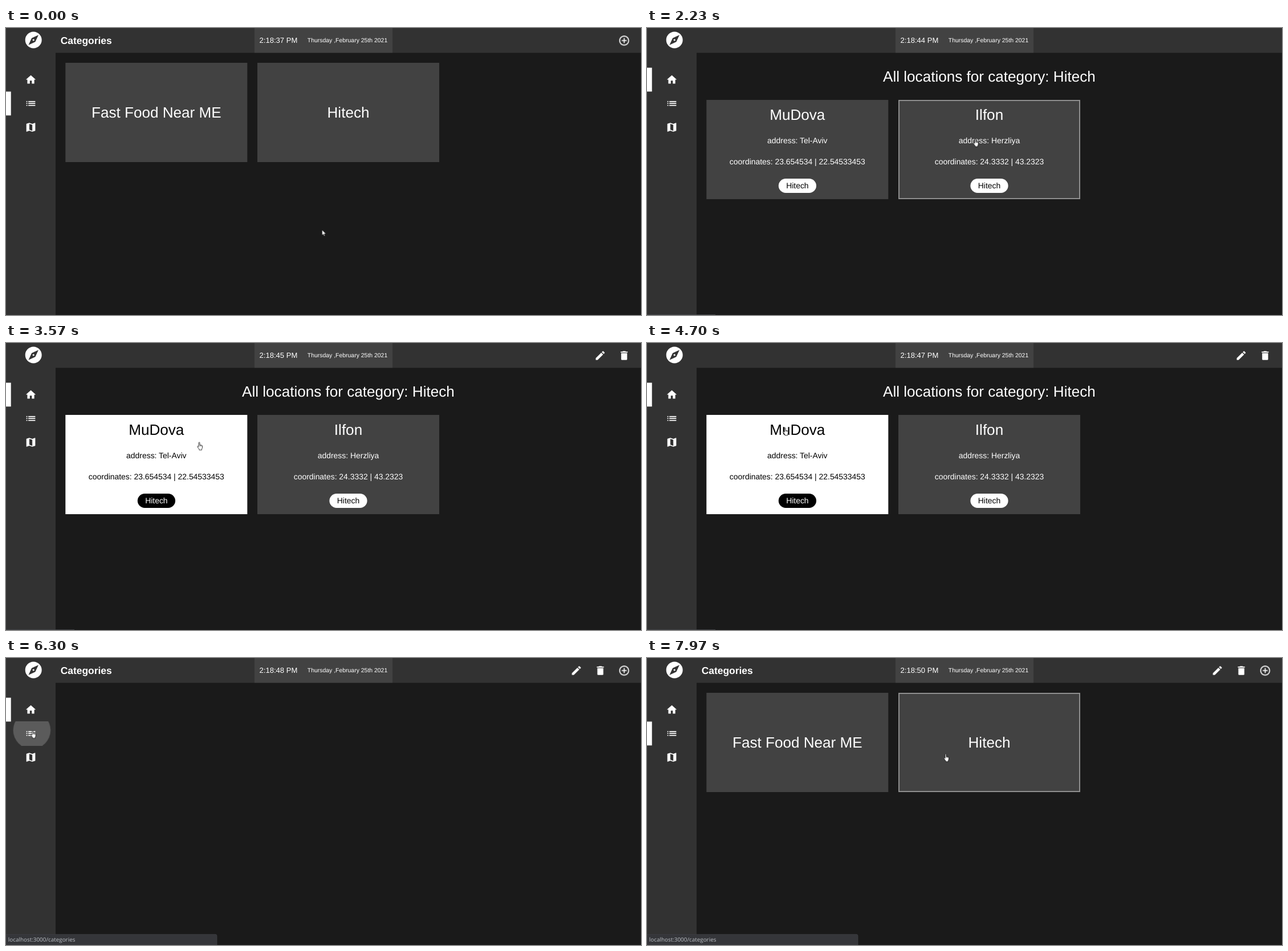
Animation, 1114 px wide and 503 px high, one loop 8000 ms. Source, as an HTML page:

```html
<!DOCTYPE html>
<html lang="en">
<head>
<meta charset="utf-8">
<title>Categories</title>
<style>
html, body { margin: 0; width: 100%; height: 100%; overflow: hidden; background: #1a1a1a; }
svg { position: absolute; left: 0; top: 0; }
svg, .clock { font-family: "Liberation Sans", Arial, sans-serif; text-rendering: geometricPrecision; }
text { fill: #fff; }
.big { font-size: 26.1px; text-anchor: middle; }
.mid { font-size: 13.92px; text-anchor: middle; }
.icon { fill: #fff; }
.edge { fill: none; stroke: #8e8e8e; stroke-width: 2; }

/* cards */
.card { --bg: #424242; --ink: #fff; --tag: #000; }
.card .bg { fill: var(--bg); }
.card text, .card .chip { fill: var(--ink); }
.card .tag { fill: var(--tag); }

/* one 8 s loop, hard changes */
.t { animation: 8s step-end infinite; }
.locations { animation-name: locations; }
.heading { animation-name: heading; }
.categories { animation-name: categories; }
.bar { animation-name: bar; }
.tools { animation-name: tools; }
.marked { animation-name: marked; }
.popup { animation-name: popup; }
.litA { animation-name: litA; }
.litB { animation-name: litB; }
.edgeA { animation-name: edgeA; }
.edgeB { animation-name: edgeB; }
.edgeC { animation-name: edgeC; }
.edgeD { animation-name: edgeD; }
.sliver { animation-name: sliver; }
.status { animation-name: status; }
.wide { animation-name: wide; }
.arrow { animation-name: arrow; }
.hand { animation-name: hand; }

@keyframes locations { 0% { opacity: 0 } 6.25% { opacity: 1 } 77.125%, 100% { opacity: 0 } }
@keyframes heading { 0% { opacity: 1 } 6.25% { opacity: 0 } 77.125%, 100% { opacity: 1 } }
@keyframes categories { 0% { opacity: 1 } 6.25% { opacity: 0 } 80.4%, 100% { opacity: 1 } }
@keyframes bar {
  0% { transform: translateY(41.8px) }
  6.25% { transform: none }
  80.4%, 100% { transform: translateY(41.8px) }
}
@keyframes tools {
  0% { opacity: 0; transform: none }
  30.4% { opacity: 1; transform: none }
  77.125%, 100% { opacity: 1; transform: translateX(-41.8px) }
}
@keyframes marked { 0% { opacity: 0 } 11.25% { opacity: 1 } 22.1%, 100% { opacity: 0 } }
@keyframes popup { 0% { opacity: 0 } 17.125% { opacity: 1 } 22.1%, 100% { opacity: 0 } }
@keyframes litA {
  0% { --bg: #424242; --ink: #fff; --tag: #000 }
  44.625%, 100% { --bg: #fff; --ink: #000; --tag: #fff }
}
@keyframes litB {
  0% { --bg: #424242; --ink: #fff; --tag: #000 }
  30.4% { --bg: #fff; --ink: #000; --tag: #fff }
  44.625%, 100% { --bg: #424242; --ink: #fff; --tag: #000 }
}
@keyframes edgeA { 0% { opacity: 0 } 37.25% { opacity: 1 } 44.625%, 100% { opacity: 0 } }
@keyframes edgeB { 0% { opacity: 0 } 22.4% { opacity: 1 } 30.4%, 100% { opacity: 0 } }
@keyframes edgeC { 0% { opacity: 0 } 89.6% { opacity: 1 } 98.75%, 100% { opacity: 0 } }
@keyframes edgeD { 0% { opacity: 0 } 98.75%, 100% { opacity: 1 } }
@keyframes sliver { 0% { opacity: 0 } 6.25% { opacity: 1 } 67%, 100% { opacity: 0 } }
@keyframes status { 0% { opacity: 0 } 67%, 100% { opacity: 1 } }
@keyframes wide { 0% { width: 131px } 77.125%, 100% { width: 373px } }
@keyframes arrow {
  0% { opacity: 1 } 22.4% { opacity: 0 } 61.7% { opacity: 1 } 64.2%, 100% { opacity: 0 }
}
@keyframes hand {
  0% { opacity: 0 } 22.4% { opacity: 1 } 61.7% { opacity: 0 } 64.2%, 100% { opacity: 1 }
}

.clock {
  position: absolute; left: 444.6px; top: 14px;
  font-size: 13.05px; line-height: 15px; color: #fff; white-space: pre;
}
.clock::after { content: "2:18:37 PM"; animation: clock 8s step-end infinite; }
@keyframes clock {
  0% { content: "2:18:37 PM" }
  6.25% { content: "2:18:43 PM" }
  20.375% { content: "2:18:44 PM" }
  32.875% { content: "2:18:45 PM" }
  45.375% { content: "2:18:46 PM" }
  57.875% { content: "2:18:47 PM" }
  69.5% { content: "2:18:48 PM" }
  82.5% { content: "2:18:49 PM" }
  95%, 100% { content: "2:18:50 PM" }
}

.spin { transform-origin: 915.5px 118.3px; animation: spin 1s steps(8) .37s infinite; }
@keyframes spin { to { transform: rotate(360deg) } }

.ripple { fill: #fff; transform-origin: 45.3px 126.5px; animation: ripple 8s linear infinite; }
@keyframes ripple {
  0%, 77.1% { opacity: 0; transform: scale(.2) }
  77.125% { opacity: .2; transform: scale(.35) }
  78.7% { opacity: .2; transform: scale(1) }
  80.4% { opacity: .2; transform: scale(1.25) }
  85%, 100% { opacity: 0; transform: scale(1.25) }
}

.pointer { animation: move 8s linear infinite; }
@keyframes move {
  0%, 6.24% { transform: translate(554.5px, 353.8px) }
  6.25%, 11.24% { transform: translate(798px, 85px) }
  11.25%, 20% { transform: translate(787.7px, 89.3px) }
  27.1% { transform: translate(575px, 196px) }
  30%, 34.7% { transform: translate(563px, 188px) }
  37.875% { transform: translate(388px, 177px) }
  41.25%, 55.3% { transform: translate(335px, 173.5px) }
  65.375% { transform: translate(53px, 99px) }
  69.625% { transform: translate(47.7px, 107.3px) }
  75.375%, 87.9% { transform: translate(42.7px, 126.6px) }
  97.875% { transform: translate(395px, 188px) }
  99.6%, 100% { transform: translate(520px, 167.5px) }
}
</style>
</head>
<body>
<svg width="1114" height="503" viewBox="0 0 1114 503">
  <defs>
    <clipPath id="navItem"><rect y="111.4" width="87" height="41.8"/></clipPath>
    <clipPath id="round"><circle cx="814.5" cy="118.4" r="10.8"/></clipPath>
    <circle id="dot" cx="915.5" cy="110.9" r="1.8"/>
    <filter id="shadow" x="-10%" y="-30%" width="120%" height="160%">
      <feDropShadow dx="0" dy="1" stdDeviation="1.5" flood-color="#000" flood-opacity=".5"/>
    </filter>
  </defs>

  <rect width="1114" height="503" fill="#1a1a1a"/>
  <path fill="#323232" d="M0 0H1114V43.4H87V503H0z"/>
  <rect x="436" width="242" height="43.4" fill="#424242"/>
  <text x="528.8" y="25" font-size="10.44">Thursday ,February 25th 2021</text>

  <!-- sidebar -->
  <path class="icon" transform="translate(30.8 3.6) scale(1.45)" d="M12 10.9c-.61 0-1.1.49-1.1 1.1s.49 1.1 1.1 1.1c.61 0 1.1-.49 1.1-1.1s-.49-1.1-1.1-1.1zM12 2C6.48 2 2 6.48 2 12s4.48 10 10 10 10-4.48 10-10S17.52 2 12 2zm2.19 12.19L6 18l3.81-8.19L18 6l-3.81 8.19z"/>
  <rect class="t bar" y="69.6" width="8.7" height="41.8" fill="#fff"/>
  <g clip-path="url(#navItem)"><circle class="ripple" cx="45.3" cy="126.5" r="32.5"/></g>
  <path class="icon" transform="translate(33.1 80.1) scale(.87)" d="M10 20v-6h4v6h5v-8h3L12 3 2 12h3v8z"/>
  <path class="icon" transform="translate(33.1 121.8) scale(.87)" d="M3 13h2v-2H3zm0 4h2v-2H3zm0-8h2V7H3zm4 4h14v-2H7zm0 4h14v-2H7zM7 7v2h14V7z"/>
  <path class="icon" transform="translate(33.1 163.6) scale(.87)" d="M20.5 3l-.16.03L15 5.1 9 3 3.36 4.9c-.21.07-.36.25-.36.48V20.5c0 .28.22.5.5.5l.16-.03L9 18.9l6 2.1 5.64-1.9c.21-.07.36-.25.36-.48V3.5c0-.28-.22-.5-.5-.5zM15 19l-6-2.11V5l6 2.11V19z"/>

  <!-- header -->
  <g class="t heading">
    <text x="95.7" y="28" font-size="17.4" font-weight="700">Categories</text>
    <path class="icon" transform="translate(1074 11.6) scale(.87)" d="M13 7h-2v4H7v2h4v4h2v-4h4v-2h-4V7zm-1-5C6.48 2 2 6.48 2 12s4.48 10 10 10 10-4.48 10-10S17.52 2 12 2zm0 18c-4.41 0-8-3.59-8-8s3.59-8 8-8 8 3.59 8 8-3.59 8-8 8z"/>
  </g>
  <g class="t tools">
    <path class="icon" transform="translate(1032 11.6) scale(.87)" d="M3 17.25V21h3.75L17.81 9.94l-3.75-3.75zM20.71 7.04c.39-.39.39-1.02 0-1.41l-2.34-2.34c-.39-.39-1.02-.39-1.41 0l-1.83 1.83 3.75 3.75z"/>
    <path class="icon" transform="translate(1074 11.6) scale(.87)" d="M6 19c0 1.1.9 2 2 2h8c1.1 0 2-.9 2-2V7H6zM19 4h-3.5l-1-1h-5l-1 1H5v2h14z"/>
  </g>

  <!-- category cards -->
  <g class="t categories">
    <g class="card" transform="translate(104.3 61)">
      <rect class="bg" width="319" height="174"/>
      <rect class="edge t edgeC" x="1" y="1" width="317" height="172"/>
      <text class="big" x="159.5" y="96">Fast Food Near ME</text>
    </g>
    <g class="card" transform="translate(441 61)">
      <rect class="bg" width="319" height="174"/>
      <rect class="edge t edgeD" x="1" y="1" width="317" height="172"/>
      <text class="big" x="159.5" y="96">Hitech</text>
    </g>
  </g>

  <!-- location cards -->
  <g class="t locations">
    <rect class="t marked" x="713" y="69.6" width="74" height="30.4" fill="#2563d2"/>
    <text class="big" x="600.4" y="94">All locations for category: Hitech</text>
    <g class="card t litA">
      <g transform="translate(104.3 126)">
        <rect class="bg" width="319" height="174"/>
        <rect class="edge t edgeA" x="1" y="1" width="317" height="172"/>
        <text class="big" x="159.5" y="35">MuDova</text>
        <text class="mid" x="159.5" y="75.5">address: Tel-Aviv</text>
        <text class="mid" x="159.5" y="113">coordinates: 23.654534 | 22.54533453</text>
        <rect class="chip" x="126.5" y="138" width="66.2" height="25" rx="12.5"/>
        <text class="mid tag" x="159.6" y="155.4">Hitech</text>
      </g>
    </g>
    <g class="card t litB">
      <g transform="translate(441 126)">
        <rect class="bg" width="319" height="174"/>
        <rect class="edge t edgeB" x="1" y="1" width="317" height="172"/>
        <text class="big" x="159.5" y="35">Ilfon</text>
        <text class="mid" x="159.5" y="75.5">address: Herzliya</text>
        <text class="mid" x="159.5" y="113">coordinates: 24.3332 | 43.2323</text>
        <rect class="chip" x="126.4" y="138" width="66.2" height="25" rx="12.5"/>
        <text class="mid tag" x="159.5" y="155.4">Hitech</text>
      </g>
    </g>
  </g>

  <!-- translation popup -->
  <g class="t popup">
    <rect x="797.4" y="95.5" width="215.2" height="46" rx="6.5" fill="#fff" stroke="#c8cacd" stroke-width=".8" filter="url(#shadow)"/>
    <circle cx="814.5" cy="118.4" r="11.4" fill="#fff" stroke="#8b8d90" stroke-width="1"/>
    <g clip-path="url(#round)">
      <path fill="#2457c5" d="M802 109.5h25v3.4h-25zM802 124h25v3.4h-25z"/>
      <path fill="none" stroke="#2457c5" stroke-width=".9" d="M814.5 114.8l3 5.2h-6zM814.5 122l-3-5.2h6z"/>
    </g>
    <path fill="none" stroke="#222" stroke-width="1.5" d="M831.7 116.4l3.9 3.9 3.9-3.9"/>
    <g class="spin">
      <use href="#dot" transform="rotate(45 915.5 118.3)"/>
      <use href="#dot" opacity=".85"/>
      <use href="#dot" opacity=".65" transform="rotate(-45 915.5 118.3)"/>
      <use href="#dot" opacity=".5" transform="rotate(-90 915.5 118.3)"/>
      <use href="#dot" opacity=".4" transform="rotate(-135 915.5 118.3)"/>
      <use href="#dot" opacity=".32" transform="rotate(180 915.5 118.3)"/>
      <use href="#dot" opacity=".24" transform="rotate(135 915.5 118.3)"/>
      <use href="#dot" opacity=".16" transform="rotate(90 915.5 118.3)"/>
    </g>
  </g>

  <!-- status bar -->
  <rect class="t sliver" y="502" width="120" height="1" fill="#424447"/>
  <g class="t status">
    <rect class="t wide" x="-3" y="484.3" width="131" height="24" rx="3" fill="#35363a" stroke="#414347" stroke-width=".7"/>
    <text x="3.8" y="497" font-size="9.9" font-family="'Open Sans', sans-serif" style="fill:#bdc1c6">localhost:3000/categories</text>
  </g>
</svg>

<div class="clock"></div>

<svg width="1114" height="503" viewBox="0 0 1114 503">
  <g class="pointer">
    <path class="t arrow" fill="#fff" stroke="#000" stroke-width=".6" d="M0 0V9.5L2.2 7.5 3.7 10.9 5.2 10.2 3.7 7H6.8z"/>
    <g class="t hand" stroke="#000" stroke-width=".8" stroke-linejoin="round">
      <path fill="#fff" d="M3 8.4V1.6a1 1 0 0 1 2 0V5.2l3.3.7q1.6.4 1.4 1.9L9.2 10.8q-.3 1-.8 1.6V14H3.9v-1.3L.9 8.7q-.5-1.1.5-1.4.8 0 1.6 1.1z"/>
      <path fill="none" stroke-width=".5" d="M5 5.2v2.3M6.6 5.6v2M8.1 6v1.8"/>
    </g>
  </g>
</svg>
</body>
</html>
```
